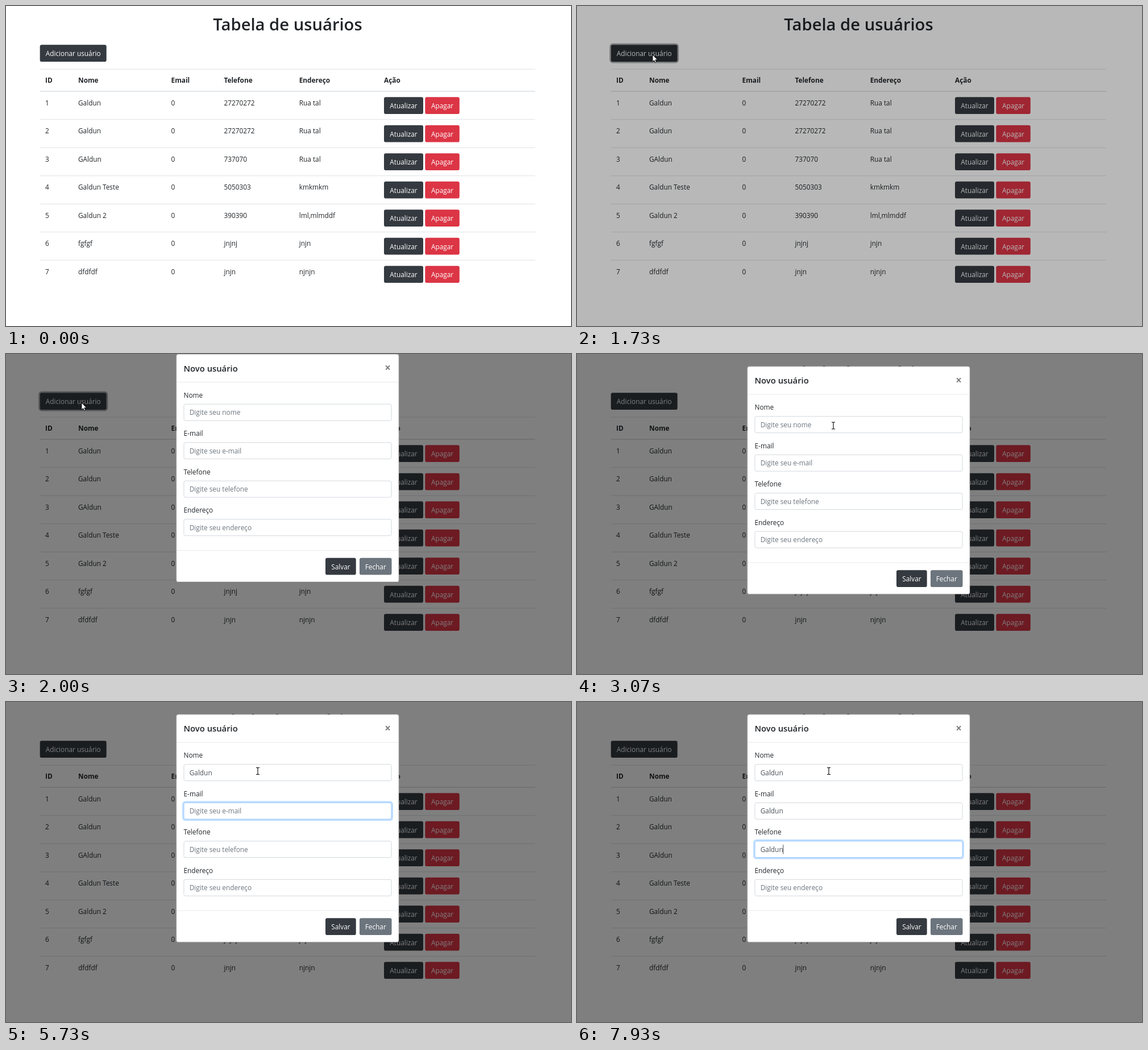
Animation of 994 by 563 pixels, one loop 8000 ms. Source, as an HTML page:

```html
<!DOCTYPE html>
<html lang="pt-BR">
<head>
<meta charset="utf-8">
<title>Tabela de usuários</title>
<style>
html, body { margin: 0; width: 100%; height: 100%; overflow: hidden; background: #fff; }
svg { display: block; width: 100vw; height: 100vh; }
text { font: 11.83px "Open Sans", "Noto Sans", sans-serif; fill: #212529; }
text.bold { font-size: 11.85px; font-weight: 700; }
text.title { font-size: 29.2px; font-weight: 600; text-anchor: middle; }
text.head { font-size: 14.8px; font-weight: 600; }
text.close { font-size: 18.8px; font-weight: 700; fill: #7f7f7f; text-anchor: middle; }
text.btn { fill: #fff; text-anchor: middle; }
</style>
</head>
<body>
<svg id="stage" viewBox="0 0 994 563"></svg>
<script>
const LOOP = 8000, STEP = 1000 / 15, BLINK = 530;
const DARK = [52, 58, 64], HOVER = [35, 39, 43], ACTIVE = [29, 33, 36];
const NAME = 'Galdun';
const stage = document.getElementById('stage');

function add(parent, tag, attrs, content) {
  const el = document.createElementNS('http://www.w3.org/2000/svg', tag);
  set(el, attrs);
  if (content) el.textContent = content;
  parent.appendChild(el);
  return el;
}
function set(el, attrs) {
  for (const key in attrs) el.setAttribute(key, attrs[key]);
}
const group = parent => add(parent, 'g', {});
const label = (parent, x, y, content, cls = '') => add(parent, 'text', { x, y, class: cls }, content);
const box = (parent, x, y, width, height, fill, rx = 0) =>
  add(parent, 'rect', { x, y, width, height, fill, rx });
const hline = (parent, x, y, width, height, fill) => box(parent, x, y, width, height, fill);

function button(parent, x, y, width, content, fill) {
  const shape = box(parent, x, y, width, 29.8, fill, 3.1);
  label(parent, x + width / 2, y + 19.8, content, 'btn');
  return shape;
}

const clamp = v => Math.max(0, Math.min(1, v));
const ramp = (t, start, length = 150) => clamp((t - start) / length);
const mix = (a, b, p) => a.map((v, i) => v + (b[i] - v) * p);
const rgb = c => `rgb(${c.map(Math.round)})`;

// cubic-bezier(0, 0, .58, 1)
function easeOut(x) {
  let lo = 0, hi = 1;
  for (let i = 0; i < 20; i++) {
    const s = (lo + hi) / 2;
    if (1.74 * (1 - s) * s * s + s ** 3 < x) lo = s; else hi = s;
  }
  return 3 * (1 - lo) * lo * lo + lo ** 3;
}

// Page
const page = group(stage);
box(page, 0, 0, 994, 563, '#fff');
label(page, 495.5, 42.5, 'Tabela de usuários', 'title');
const ring = add(page, 'rect', { fill: 'none', stroke: 'rgb(82,88,93)', 'stroke-opacity': .5 });
const addButton = button(page, 59.7, 68.2, 117, 'Adicionar usuário', rgb(DARK));

const cols = [69, 127, 290.6, 383.4, 515.7, 665];
const rows = [
  [NAME, '27270272', 'Rua tal'],
  [NAME, '27270272', 'Rua tal'],
  ['GAldun', '737070', 'Rua tal'],
  [NAME + ' Teste', '5050303', 'kmkmkm'],
  [NAME + ' 2', '390390', 'lml,mlmddf'],
  ['fgfgf', 'jnjnj', 'jnjn'],
  ['dfdfdf', 'jnjn', 'njnjn']
];
hline(page, 59.7, 110.6, 871.3, 1, '#dee2e6');
hline(page, 59.7, 149.3, 871.3, 1.6, '#dee2e6');
['ID', 'Nome', 'Email', 'Telefone', 'Endereço', 'Ação'].forEach((h, i) => label(page, cols[i], 135.2, h, 'bold'));
rows.forEach(([name, phone, street], r) => {
  const y = r * 49.5;
  if (r) hline(page, 59.7, 149.7 + y, 871.3, 1, '#dee2e6');
  [r + 1, name, '0', phone, street].forEach((v, i) => label(page, cols[i], 174.5 + y, v));
  button(page, 665, 160.2 + y, 69, 'Atualizar', rgb(DARK));
  button(page, 737.3, 160.2 + y, 60.5, 'Apagar', '#dc3545');
});

const backdrop = box(stage, 0, 0, 994, 563, '#000');

// Modal
const modal = group(stage);
box(modal, 299.6, 21.8, 391.6, 400.8, '#fff', 3.9);
add(modal, 'rect', {
  x: 300, y: 22.2, width: 390.8, height: 400, rx: 3.6,
  fill: 'none', stroke: '#000', 'stroke-opacity': .2, 'stroke-width': .8
});
label(modal, 312.5, 52, 'Novo usuário', 'head');
label(modal, 671.7, 52.8, '×', 'close');
hline(modal, 300.4, 70.6, 390, .9, '#e4e7ea');
hline(modal, 300.4, 366.5, 390, .9, '#e4e7ea');
button(modal, 562, 380.2, 53.7, 'Salvar', rgb(DARK));
button(modal, 622, 380.2, 56.5, 'Fechar', '#6c757d');

const fields = [
  { title: 'Nome', hint: 'nome', focus: 3270, blur: 5200, keys: [4200, 4270, 4400, 4470, 4670, 4730] },
  { title: 'E-mail', hint: 'e-mail', focus: 5200, blur: 6670, keys: [5930, 6000, 6130, 6200, 6470, 6470] },
  { title: 'Telefone', hint: 'telefone', focus: 6670, blur: 9000, keys: [7400, 7470, 7600, 7670, 7870, 7930] },
  { title: 'Endereço', hint: 'endereço', focus: 9000, blur: 9500, keys: [] }
];
fields.forEach((f, i) => {
  const y = i * 67.5;
  label(modal, 312.5, 98.4 + y, f.title);
  f.glow = add(modal, 'rect', {
    x: 311.25, y: 108.05 + y, width: 368.5, height: 32.3, rx: 4.4,
    fill: 'none', stroke: 'rgb(0,123,255)', 'stroke-opacity': .25, 'stroke-width': 2.5
  });
  f.frame = add(modal, 'rect', { x: 312.95, y: 109.75 + y, width: 365.1, height: 28.9, rx: 2.8, fill: '#fff', 'stroke-width': .9 });
  f.text = label(modal, 322.7, 128.8 + y, '');
  f.caret = box(modal, 323, 116 + y, 1, 16.5, '#495057');
});

// Pointer
const arrow = add(stage, 'path', {
  d: 'M0 0V12.4L2.8 9.8 4.6 13.9 6.6 13 4.8 9H8.7Z',
  fill: '#fff', stroke: '#000', 'stroke-width': .8, 'stroke-linejoin': 'round'
});
const beam = add(stage, 'path', {
  d: 'M-3 -6H-1L0 -5.3 1 -6H3M0 -5.3V5.3M-3 6H-1L0 5.3 1 6H3',
  fill: 'none', stroke: '#000', 'stroke-width': 1.1
});
const paths = [
  [[671, 320, 460], [871, 285, 380], [1071, 215, 230], [1271, 150, 110], [1471, 133, 85.7]],
  [[2071, 133, 85.7], [2338, 318, 168], [2538, 420, 174], [2738, 491, 130], [2871, 474, 112], [3071, 451, 126]],
  [[3271, 451, 126], [3471, 443, 121.5]]
];

function pointerAt(t) {
  const path = paths.filter(p => t >= p[0][0]).pop();
  if (!path) return null;
  const last = path.length - 1;
  if (t >= path[last][0]) return path[last].slice(1);
  const i = path.findIndex(k => k[0] > t) - 1;
  const at = n => path[Math.max(0, Math.min(last, n))];
  const [a, b, c, d] = [at(i - 1), at(i), at(i + 1), at(i + 2)];
  const u = (t - b[0]) / (c[0] - b[0]);
  return [1, 2].map(n => b[n] + u / 2 * (c[n] - a[n]
    + u * (2 * a[n] - 5 * b[n] + 4 * c[n] - d[n] + u * (3 * (b[n] - c[n]) + d[n] - a[n]))));
}

function drawButton(t) {
  let color = mix(DARK, HOVER, ramp(t, 1290));
  color = mix(color, ACTIVE, ramp(t, 1520));
  set(addButton, { fill: rgb(mix(color, DARK, ramp(t, 1665))) });
  const w = 2.5 * (ramp(t, 1595) - ramp(t, 2125));
  set(ring, {
    x: 59.7 - w / 2, y: 68.2 - w / 2, width: 117 + w, height: 29.8 + w,
    rx: 3.1 + w / 2, 'stroke-width': w
  });
}

function drawField(f, t) {
  const lit = ramp(t, f.focus - 30) - ramp(t, f.blur - 30);
  set(f.glow, { opacity: lit });
  set(f.frame, { stroke: rgb(mix([206, 212, 218], [128, 189, 255], lit)) });
  const typed = f.keys.filter(k => t >= k).length;
  f.text.textContent = typed ? NAME.slice(0, typed) : 'Digite seu ' + f.hint;
  f.text.style.fill = typed ? '#495057' : '#6c757d';
  const since = t - (typed ? f.keys[typed - 1] : f.focus);
  const on = t >= f.focus && t < f.blur && Math.floor(since / BLINK) % 2 === 0;
  set(f.caret, {
    x: typed ? 322.3 + f.text.getComputedTextLength() : 322.9,
    opacity: on ? 1 : 0
  });
}

function drawPointer(t) {
  const p = pointerAt(t);
  const editing = p && t > 2071 && p[0] > 312 && fields.some((f, i) => Math.abs(p[1] - 124.2 - i * 67.5) < 15);
  set(arrow, { opacity: p && !editing ? 1 : 0 });
  set(beam, { opacity: editing ? 1 : 0 });
  if (p) set(editing ? beam : arrow, { transform: `translate(${p[0]} ${p[1]})` });
}

function draw(t) {
  drawButton(t);
  set(backdrop, { opacity: .5 * ramp(t, 1655) });
  set(modal, {
    opacity: ramp(t, 1825),
    transform: `translate(0 ${-100 * (1 - easeOut(ramp(t, 1825, 300)))})`
  });
  fields.forEach(f => drawField(f, t));
  drawPointer(t);
}

const start = performance.now();
function tick() {
  const now = Math.max(0, performance.now() - start) % LOOP;
  draw(Math.floor(now / STEP + .05) * STEP + 5);
  requestAnimationFrame(tick);
}
tick();
</script>
</body>
</html>
```
